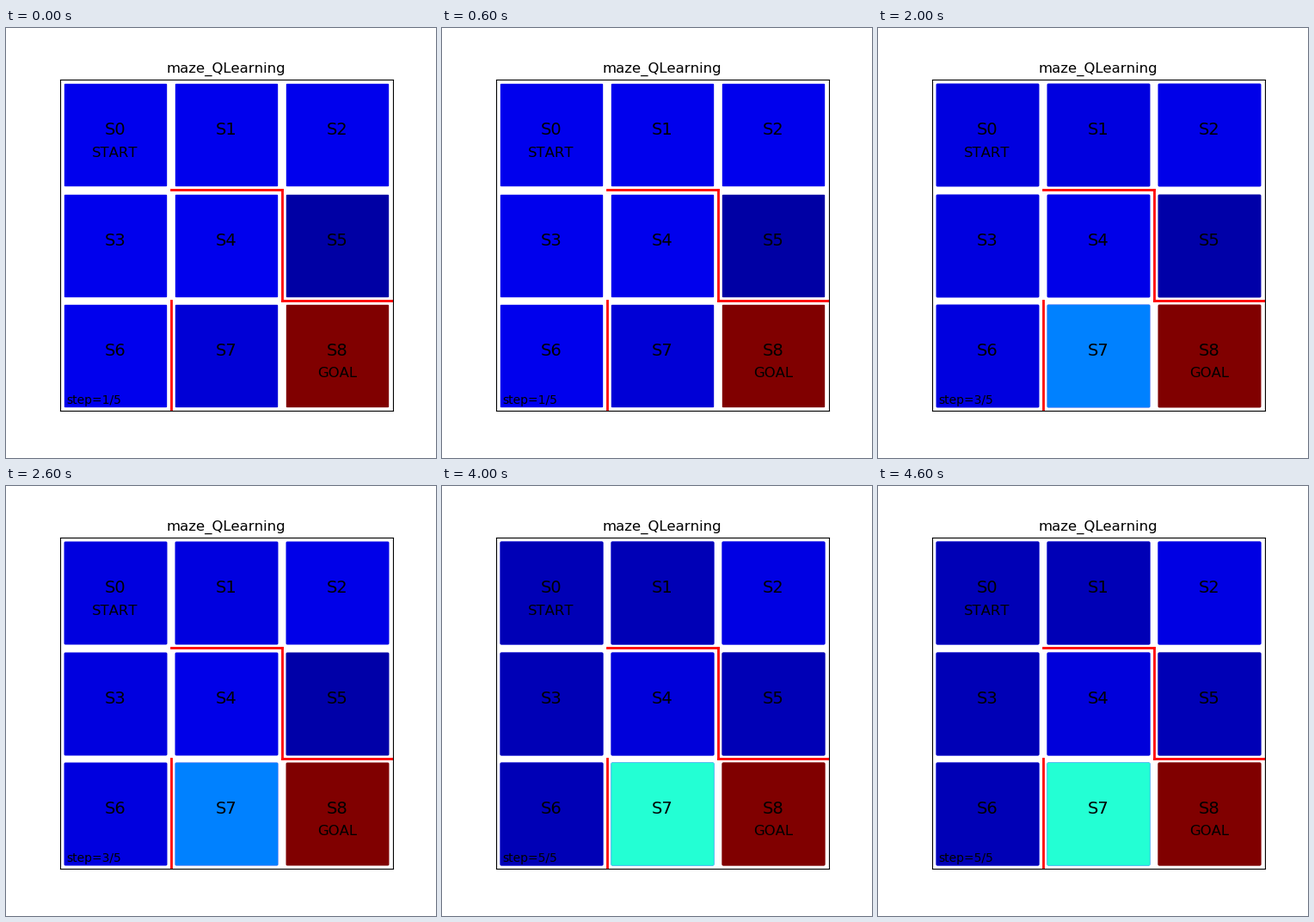
Animation of 500x500 px, one loop 5 s. Source, as a matplotlib script:

```python
import matplotlib.pyplot as plt
from matplotlib.animation import FuncAnimation

plt.rcParams["text.kerning_factor"] = 6

STEPS = 5
RATE = 0.1
LABEL_SIZE = 11.87  # just under 12, so hinting keeps the letters low

# Cells that learn towards 1, with their first value
LEARNING = {7: 0.076, 8: 1.0}

WALLS = [
    ([1, 1], [0, 1]),
    ([1, 2], [2, 2]),
    ([2, 2], [2, 1]),
    ([2, 3], [1, 1]),
]


def center(state):
    return state % 3 + 0.5, 2.5 - state // 3


def value(state, step):
    if state in LEARNING:
        return 1 - (1 - LEARNING[state]) * (1 - RATE) ** step
    # The other cells drift, ever faster, between two colormap levels
    start = {5: 8}.get(state, 24)
    end = {2: 22, 4: 20}.get(state, 12)
    t = step / (STEPS - 1)
    return (start + (end - start) * t ** 2) / 256


def make_layer(step):
    squares = []
    for state in range(9):
        x, y = center(state)
        squares += ax.plot([x], [y], marker="s", markersize=85,
                           color=plt.cm.jet(value(state, step)))
    return squares


fig, ax = plt.subplots(figsize=(5, 5), dpi=100)
fig.subplots_adjust(left=0.125, right=0.9, bottom=0.11, top=0.88)
ax.set(xlim=(0, 3), ylim=(0, 3), xticks=[], yticks=[])
ax.set_title("maze_QLearning", fontsize=LABEL_SIZE)

for xs, ys in WALLS:
    ax.plot(xs, ys, color="red", linewidth=2)

for state in range(9):
    x, y = center(state)
    ax.text(x, y, f"S{state}", size=14, ha="center")
for state, name in ((0, "START"), (8, "GOAL")):
    x, y = center(state)
    ax.text(x, y - 0.2, name, size=LABEL_SIZE, ha="center")

step_text = ax.text(0.02, 0.02, "", size=10, transform=ax.transAxes)
layers = [make_layer(step) for step in range(STEPS)]


def update(step):
    # Each step paints over the earlier ones, so square edges build up
    for i, layer in enumerate(layers):
        for square in layer:
            square.set_visible(i <= step)
    step_text.set_text(f"step={step + 1}/{STEPS}")
    return [*sum(layers, []), step_text]


anim = FuncAnimation(fig, update, frames=STEPS, interval=1000,
                     repeat=True, repeat_delay=0, blit=False)

plt.show()
```
